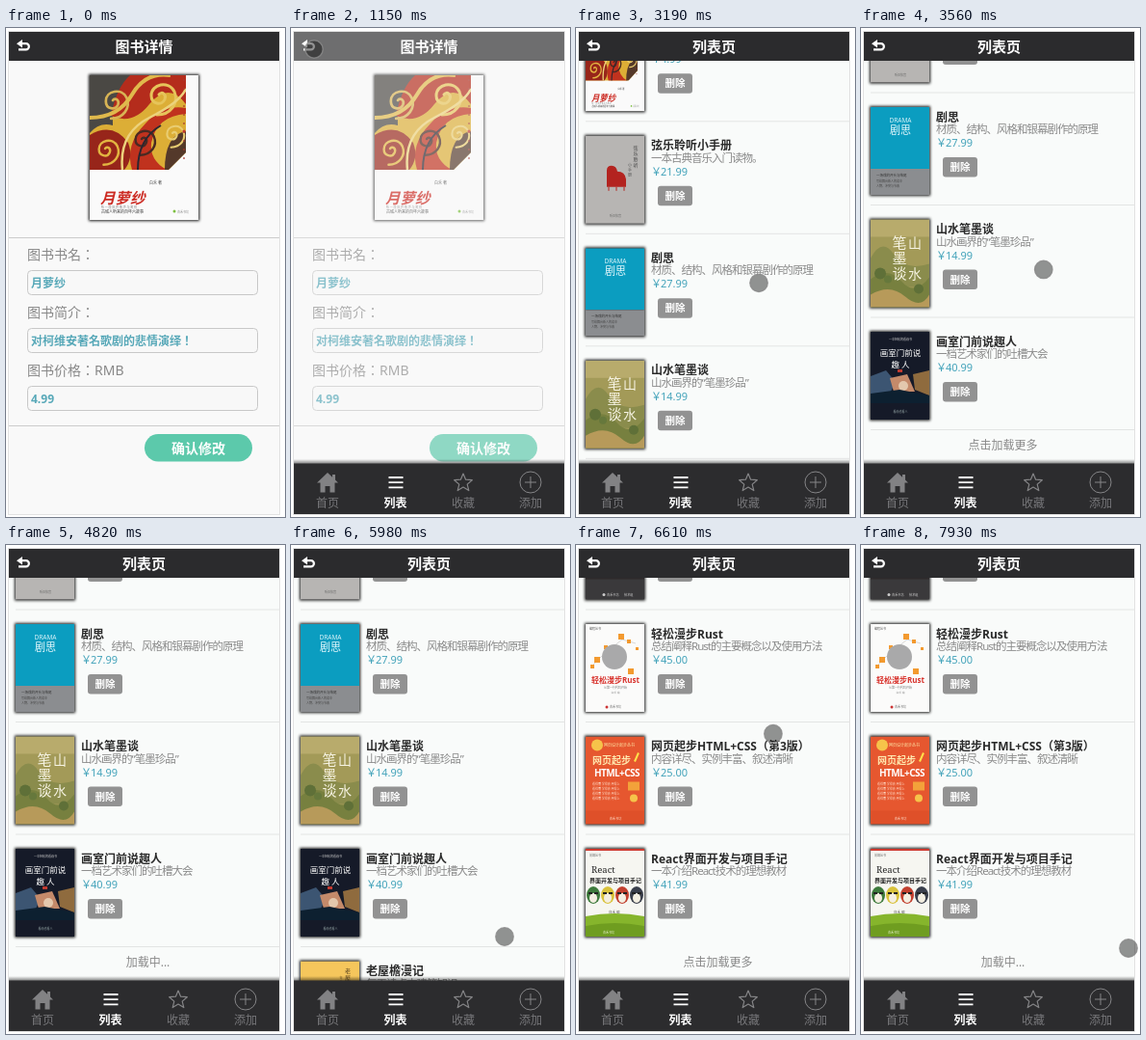
These frames come from a looping animation (290 px wide and 507 px high, 7990 ms). An HTML page:

```html
<!DOCTYPE html>
<html lang="zh-CN">
<head>
<meta charset="utf-8">
<title>图书列表</title>
<style>
html, body { margin: 0; width: 100%; height: 100%; overflow: hidden; background: #fff; }
svg { display: block; width: 290px; height: 507px; }
text { font-family: "Noto Sans", "Noto Sans CJK SC", "Noto Sans CJK", sans-serif; white-space: pre; }
/* Traditional glyphs centre their full-width punctuation */
.wide { font-family: "Noto Sans", "Noto Sans CJK TC", "Noto Sans CJK", sans-serif; }
.bold { font-weight: 700; }
.desc { letter-spacing: -1px; }
.serif { font-family: "Noto Serif", serif; }
</style>
</head>
<body>
<svg id="stage" viewBox="0 0 290 507"></svg>
<script>
const LOOP = 7990;
const PITCH = 116.5, TOP = 47.5;
const TEAL = '#57a8b8', DARK = '#2b2b2d';

// Drawing helpers
const rect = (x, y, w, h, fill, more = '') =>
  `<rect x="${x}" y="${y}" width="${w}" height="${h}" fill="${fill}" ${more}/>`;
const path = (d, fill, more = '') => `<path d="${d}" fill="${fill}" ${more}/>`;
const line = (d, color, width = 1, more = '') =>
  path(d, 'none', `stroke="${color}" stroke-width="${width}" ${more}`);
const dot = (x, y, r, fill, more = '') => `<circle cx="${x}" cy="${y}" r="${r}" fill="${fill}" ${more}/>`;
const text = (x, y, size, fill, s, more = '') =>
  `<text x="${x}" y="${y}" font-size="${size}" fill="${fill}" ${more}>${s}</text>`;
const mid = (x, y, size, fill, s, cls = '', more = '') =>
  text(x, y, size, fill, s, `text-anchor="middle" class="${cls}" ${more}`);
const column = (x, y, size, step, fill, s, cls = '') =>
  [...s].map((c, i) => mid(x, y + i * step, size, fill, c, cls)).join('');
const group = (body, more = '') => `<g ${more}>${body}</g>`;
const shadow = (x, y, w, h) => rect(x, y, w, h, '#000', 'filter="url(#soft)" opacity=".9"');

// Book covers, 61 x 91 except the opera one, which is 113 x 150
const swirl = (x, y, k, color) =>
  line('M0 0c3 -4 8 0 6 5c-3 7 -14 5 -14 -4c0 -12 18 -16 24 -4c5 12 -4 24 -18 24',
    color, 3, `transform="translate(${x} ${y}) scale(${k})" stroke-linecap="round"`);

const operaCover =
  rect(0, 0, 113, 150, '#fafafa') +
  group(
    rect(0, 0, 100, 98, '#dcae36') +
    path('M0 0H46Q22 20 24 52Q10 48 0 60Z', '#4a4844') +
    path('M42 0H100V30Q82 6 62 30Q45 52 22 42Q28 12 42 0Z', '#b42c1c') +
    path('M100 40Q70 42 64 70Q62 88 80 98H44Q36 72 58 50Q76 30 100 34Z', '#c0321e') +
    path('M0 62Q24 48 40 70Q46 86 36 98H0Z', '#97251a') +
    path('M100 58Q78 62 78 98H100Z', '#54392a') +
    swirl(24, 26, .9, '#d8b455') + swirl(72, 20, 1, '#e6c45a') +
    swirl(16, 76, .8, '#e2b541') + swirl(54, 66, .8, '#4a2a22') + swirl(86, 60, .7, '#e9cd72') +
    line('M0 44Q30 44 44 20T84 0', '#e0b94c', 4) +
    line('M34 98Q30 60 62 44T100 14', '#ecd27c', 2.5) +
    line('M50 98Q50 66 74 52', '#2b2630', 2), 'clip-path="url(#artClip)"') +
  line('M98 4V90', '#a83a30', 1.2, 'stroke-dasharray="2 7"') +
  dot(98, 58, 1.6, '#c23a2c') +
  text(62, 113, 4, '#444', '白禾 著') +
  text(11, 133, 15.5, '#cc2a22', '月萝纱', 'class="bold" font-style="italic"') +
  text(12, 138, 3, '#777', '听 一 段 旧 时 歌 声 与 离 别') +
  text(12, 143, 4, '#333', '古城人听来的百年六故事') +
  dot(88, 141, 1.5, '#7cbf3f') + text(91, 143, 3, '#888', '青禾书坊');

const covers = [
  `<g transform="scale(.54 .607)">${operaCover}</g>`,

  rect(0, 0, 61, 91, '#b7b5b3') +
    path('M22 53V36Q22 31 27 31Q32 31 33 37Q41 37 42 45V53Z', '#b3231f') +
    line('M24 53V57M32 53V57M40 53V57', '#b3231f') +
    column(52, 14, 5, 6, '#444', '弦乐聆听') + column(46, 32, 4, 5, '#555', '小手册') +
    mid(31, 84, 3, '#666', '听见弦音'),

  rect(0, 0, 61, 64, '#0b9dc0') + rect(0, 64, 61, 27, '#8b8d90') +
    mid(31, 16, 6.5, '#d8f2f8', 'DRAMA') + mid(31, 28, 11, '#e6f8fc', '剧思') +
    text(6, 72, 3.5, '#333', '一场戏的开头与结尾') + text(6, 78, 3, '#444', '写给舞台新人的读本') +
    text(6, 83, 3, '#444', '人物、冲突与节奏'),

  rect(0, 0, 61, 91, '#a39a58') + rect(0, 0, 61, 18, '#b8ab6c') +
    path('M0 40Q12 18 24 36T61 46V70H0Z', '#8a8c4c') +
    path('M0 62Q18 48 32 64T61 60V91H0Z', '#77803f') +
    path('M0 78Q20 66 36 80T61 78V91H0Z', '#b79a5a') +
    dot(10, 56, 6, '#5f7038') + dot(18, 62, 4, '#66783c') + dot(50, 72, 5, '#5f7038') +
    column(30, 29, 15, 16, '#f6f3e2', '笔墨谈') + column(46, 29, 14, 32, '#f6f3e2', '山水'),

  rect(0, 0, 61, 91, '#151a28') +
    mid(31, 9, 3, '#ccc', '一本轻松的看画书') +
    mid(31, 25, 8.5, '#fff', '画室门前说') + mid(31, 37, 8.5, '#fff', '趣 人') +
    rect(28, 39, 5, 3, '#c03a30') +
    path('M0 46L16 40L26 52L20 64H0Z', '#3c5572') + path('M20 48L38 44L46 62H24Z', '#c48a6a') +
    path('M44 44L61 40V66L46 60Z', '#8f6b3e') + dot(34, 56, 5, '#e3c8ad') +
    path('M0 64L30 60L61 66V74H0Z', '#0d2030') + mid(31, 84, 3, '#9aa', '看画也看人'),

  rect(0, 0, 61, 91, '#f5c65c') +
    dot(33, 65, 22, '#fdf6e2') +
    path('M16 58L22 52H44L50 58Z', '#8a9a80') + path('M22 50L28 44H38L44 50Z', '#8a9a80') +
    rect(19, 59, 28, 13, '#d79a50') + rect(24, 61, 3, 11, '#fff3d0') + rect(31, 61, 4, 11, '#fff3d0') +
    rect(39, 61, 3, 11, '#fff3d0') + rect(14, 72, 38, 3, '#c9c2ac') + rect(18, 76, 30, 2, '#ded6bd') +
    column(49, 12, 6, 7, '#5a4520', '老屋檐漫记') + column(42, 18, 3, 4, '#8a6d30', '每天一页'),

  rect(0, 0, 61, 91, '#3a393b') +
    text(6, 9, 3, '#ddd', '程序设计读本') + text(6, 22, 4, '#d9682e', 'Hadoop Cluster Notes') +
    text(5, 34, 12.5, '#fff', 'Hadoop', 'class="bold" letter-spacing="-.8"') +
    text(6, 45, 8.5, '#fff', '集群笔记', 'class="bold"') +
    text(6, 55, 3, '#bbb', '白禾 编') + rect(0, 62, 61, 8, '#2e2a2b') +
    dot(19, 86, 1.5, '#ccc') + text(22, 87, 3.2, '#ccc', '青禾书坊') + text(40, 87, 3.2, '#ccc', '技术组'),

  rect(0, 0, 61, 91, '#fbfbfa') +
    text(4, 6, 3, '#555', '编程丛书') + line('M8 42L20 30L38 16L52 20', '#d8d8d8') +
    [[34, 10, 6], [43, 16, 4], [9, 34, 6], [5, 42, 4], [44, 46, 6], [19, 22, 4], [52, 24, 3]]
      .map(([x, y, s]) => rect(x, y, s, s, '#f39a2f')).join('') +
    dot(30, 34, 13, '#a9a9aa') +
    mid(31, 61, 8, '#d8322c', '轻松漫步Rust', 'bold') +
    mid(31, 67, 3, '#777', '从第一行代码开始') + mid(31, 72, 2.8, '#999', '白禾 编') +
    dot(22, 86, 1.5, '#c33') + text(25, 87, 3, '#666', '青禾书坊'),

  rect(0, 0, 61, 91, '#e6572f') +
    dot(12, 9, 6, '#f6c34a') + text(19, 10, 4, '#ffe9a8', '网页设计起步丛书') +
    text(7, 28, 10, '#ffe9b0', '网页起步', 'class="bold"') + line('M51 26L55 17', '#ffe14a', 2) +
    text(9, 41, 10, '#fff', 'HTML+CSS', 'class="bold" letter-spacing="-.6"') +
    [50, 55, 60, 65].map(y => text(7, y, 3, '#ffe0cc', '看得懂 学得会 用得上')).join('') +
    rect(44, 47, 12, 9, '#f3a23a') + dot(50, 64, 4, '#f6c34a') +
    rect(0, 77, 61, 14, '#df5029') + mid(31, 86, 3.2, '#ffe0cc', '青禾书坊'),

  rect(0, 0, 61, 91, '#f6f6f1') + rect(0, 0, 61, 2, '#d03a30') +
    text(4, 8, 3, '#666', '前端丛书') +
    text(6, 25, 9.5, '#222', 'React', 'class="serif"') +
    mid(31, 35, 6, '#222', '界面开发与项目手记', 'bold') +
    ['#3d7a3c', '#d9c23c', '#c2402f', '#3a3f4c'].map((c, i) =>
      `<ellipse cx="${8 + i * 15}" cy="48" rx="7" ry="9" fill="${c}"/>` +
      `<ellipse cx="${8 + i * 15}" cy="51" rx="4" ry="5" fill="#f4efe2"/>` +
      line(`M${3 + i * 15} 46h4m2 0h4`, '#222', 2)).join('') +
    text(24, 67, 3.5, '#555', '白禾 编') +
    path('M0 70Q30 64 61 70V91H0Z', '#86b52c') + path('M0 80Q30 74 61 80V91H0Z', '#6f9d20') +
    text(18, 88, 3, '#eef6d8', '青禾书坊'),
];

const books = [
  ['月萝纱', '对柯维安著名歌剧的悲情演绎！', '4.99'],
  ['弦乐聆听小手册', '一本古典音乐入门读物。', '21.99'],
  ['剧思', '材质、结构、风格和银幕剧作的原理', '27.99'],
  ['山水笔墨谈', '山水画界的“笔墨珍品”', '14.99'],
  ['画室门前说趣人', '一档艺术家们的吐槽大会', '40.99'],
  ['老屋檐漫记', '每天读点古建筑知识。', '40.99'],
  ['Hadoop集群笔记', '一本书读懂深度学习的来龙去脉', '19.99'],
  ['轻松漫步Rust', '总结阐释Rust的主要概念以及使用方法', '45.00'],
  ['网页起步HTML+CSS（第3版）', '内容详尽、实例丰富、叙述清晰', '25.00'],
  ['React界面开发与项目手记', '一本介绍React技术的理想教材', '41.99'],
];

const bookRow = ([title, desc, price], i) => group(
  shadow(9, -1, 63, 93) +
  group(covers[i], 'transform="translate(10 0)" clip-path="url(#coverClip)"') +
  text(78, 14.5, 12, '#2a2a2a', title, 'class="wide bold" lang="zh-TW"') +
  text(78, 27, 11.5, '#8a8a8a', desc, 'class="desc"') +
  text(78, 41, 11, '#43a3ba', '￥') + text(88, 41, 11, '#43a3ba', price) +
  rect(85, 52, 36, 20.5, '#929292', 'rx="3"') + mid(103, 66, 10.5, '#fff', '删除', 'bold') +
  (i < books.length - 1 ? line('M10 101.5H284', '#e3e5e4') : ''),
  `transform="translate(0 ${TOP + i * PITCH})"`);

const header = title =>
  rect(3, 4, 281, 30, DARK) + mid(143.5, 25, 15, '#fff', title, 'bold') +
  path('M17 12L11 16.2L17 20.5Z', '#fff') +
  line('M16 16.2H20.8A3 3 0 0 1 20.8 22.3H13', '#fff', 2.2);

const field = (y, label, value) =>
  text(22, y, 14, '#888', label, 'class="wide" lang="zh-TW"') +
  rect(22.5, y + 11.5, 239, 25, '#f8f8f8', 'rx="4" stroke="#c8c8c8"') +
  text(26, y + 29, 12, TEAL, value, 'class="wide bold" lang="zh-TW"');

const detailPage =
  header('图书详情') + shadow(86, 48, 115, 152) +
  group(operaCover, 'transform="translate(87 49)"') +
  line('M3 217.5H284M3 412.5H284', '#ccc') +
  field(240, '图书书名：', books[0][0]) + field(300, '图书简介：', books[0][1]) +
  field(360, '图书价格：RMB', books[0][2]) +
  rect(144, 421, 112, 28.5, '#5cc9ab', 'rx="14.25"') + mid(200, 441, 14, '#fff', '确认修改', 'bold');

const tabs =
  rect(3, 447, 281, 5, 'url(#rise)') + rect(3, 451.5, 281, 52.5, '#2c2c2e') +
  path('M38 461L27 471.5H30.5V481.5H35.5V475H40.5V481.5H45.5V471.5H49L46 468.5V463H43V465.7Z', '#828284') +
  line('M101.5 466H116.5M101.5 471.2H116.5M101.5 476.4H116.5', '#fff', 1.8) +
  path('M179 462L181.6 468.2L188.3 468.7L183.2 473.1L184.8 479.6L179 476.1L173.2 479.6L174.8 473.1L169.7 468.7L176.4 468.2Z',
    'none', 'stroke="#858587" stroke-width="1.2" stroke-linejoin="round"') +
  dot(249, 471, 11, 'none', 'stroke="#858587"') + line('M249 465V477M243 471H255', '#858587') +
  mid(38, 496.5, 12, '#77777a', '首页') + mid(108.5, 496.5, 12, '#fff', '列表', 'bold') +
  mid(179, 496.5, 12, '#77777a', '收藏') + mid(249, 496.5, 12, '#77777a', '添加');

const stage = document.getElementById('stage');
stage.innerHTML = `
<defs>
  <filter id="soft" x="-20%" y="-20%" width="140%" height="140%"><feGaussianBlur stdDeviation="1.6"/></filter>
  <linearGradient id="rise" x2="0" y2="1">
    <stop offset="0" stop-color="#000" stop-opacity="0"/><stop offset="1" stop-color="#000" stop-opacity=".5"/>
  </linearGradient>
  <clipPath id="artClip"><path d="M0 0H100V80L82 98H0Z"/></clipPath>
  <clipPath id="coverClip"><path d="M0 0H61V91H0Z"/></clipPath>
  <clipPath id="listClip"><path d="M3 34H284V452H3Z"/></clipPath>
</defs>` +
  rect(0, 0, 290, 507, '#fff') + rect(2.5, 3.5, 282, 501, '#f9f9f9', 'stroke="#e2e2e2"') +
  group(detailPage, 'id="detail"') +
  group(
    rect(3, 4, 281, 500, '#f9fbfa') +
    group(group(
      group(books.slice(0, 5).map(bookRow).join('')) +
      group(books.slice(5).map((b, i) => bookRow(b, i + 5)).join(''), 'id="more"') +
      mid(147.5, 0, 12, '#888', '', '', 'id="footer"'),
      'id="list"'), 'clip-path="url(#listClip)"') +
    header('列表页'), 'id="listPage"') +
  group(tabs, 'id="tabs"') +
  dot(0, 0, 9.2, '#000', 'id="cursor" fill-opacity=".42" stroke="#8a8a8a" stroke-opacity=".85" stroke-width="1.4"');

const el = Object.fromEntries(
  ['detail', 'listPage', 'list', 'more', 'footer', 'tabs', 'cursor'].map(id => [id, document.getElementById(id)]));

// Smooth curve through [time, value...] keys that never overshoots
function curve(keys, t, c = 1) {
  const n = keys.length - 1;
  if (t <= keys[0][0]) return keys[0][c];
  if (t >= keys[n][0]) return keys[n][c];
  const i = keys.findIndex(k => k[0] > t) - 1;
  const slope = j => (keys[j + 1][c] - keys[j][c]) / (keys[j + 1][0] - keys[j][0]);
  const tangent = j => {
    if (j === 0 || j === n) return 0;
    const a = slope(j - 1), b = slope(j);
    return a * b <= 0 ? 0 : 2 * a * b / (a + b);
  };
  const h = keys[i + 1][0] - keys[i][0], u = (t - keys[i][0]) / h, v = 1 - u;
  return keys[i][c] * v * v * (1 + 2 * u) + keys[i + 1][c] * u * u * (3 - 2 * u) +
    h * u * v * (tangent(i) * v - tangent(i + 1) * u);
}

const cursorPaths = [
  [[275, 259, 164], [520, 140, 92], [850, 24, 22], [1240, 24, 22], [1660, 274, 170]],
  [[2535, 271, 364], [2740, 205, 288], [2920, 188, 315], [3100, 188, 315], [3190, 190, 265],
   [3330, 198, 150], [3870, 177, 406], [3920, 177, 406], [4110, 154, 434], [4450, 154, 434], [4815, 277, 415]],
  [[5495, 281, 430], [5700, 250, 390], [5980, 222, 406], [6130, 222, 406], [6370, 217, 74],
   [6410, 215, 62], [6610, 205, 195], [6920, 184, 410], [6970, 184, 410], [7190, 158, 432],
   [7470, 158, 432], [7930, 278, 418], [LOOP, 278, 418]],
];
const scrollKeys = [[3100, 0], [3190, 51.5], [3330, 165], [3480, 198.5],
  [6130, 198.5], [6370, 530], [6570, 781]];

const clamp = x => Math.max(0, Math.min(1, x));
const show = (node, on) => node.setAttribute('display', on ? 'inline' : 'none');

function draw(t) {
  const leaving = t >= 1140;
  el.detail.setAttribute('opacity', leaving ? clamp(.68 * (1340 - t) / 190) : 1);
  el.listPage.setAttribute('opacity', clamp((t - 1340) / 300));
  show(el.tabs, leaving);

  const loaded = t >= 5500, busy = t >= 7490 || (t >= 4480 && !loaded);
  show(el.list, t >= 2110);
  show(el.more, loaded);
  el.list.setAttribute('transform', `translate(0 ${-curve(scrollKeys, t)})`);
  el.footer.textContent = busy ? '加载中...' : '点击加载更多';
  el.footer.setAttribute('y', TOP + (loaded ? 9 : 4) * PITCH + 122);

  const keys = cursorPaths.find(k => t >= k[0][0] && t <= k[k.length - 1][0]);
  show(el.cursor, keys);
  if (keys) el.cursor.setAttribute('transform', `translate(${curve(keys, t)} ${curve(keys, t, 2)})`);
}

const start = performance.now();
function tick() {
  draw((performance.now() - start) % LOOP);
  requestAnimationFrame(tick);
}
tick();
</script>
</body>
</html>
```
